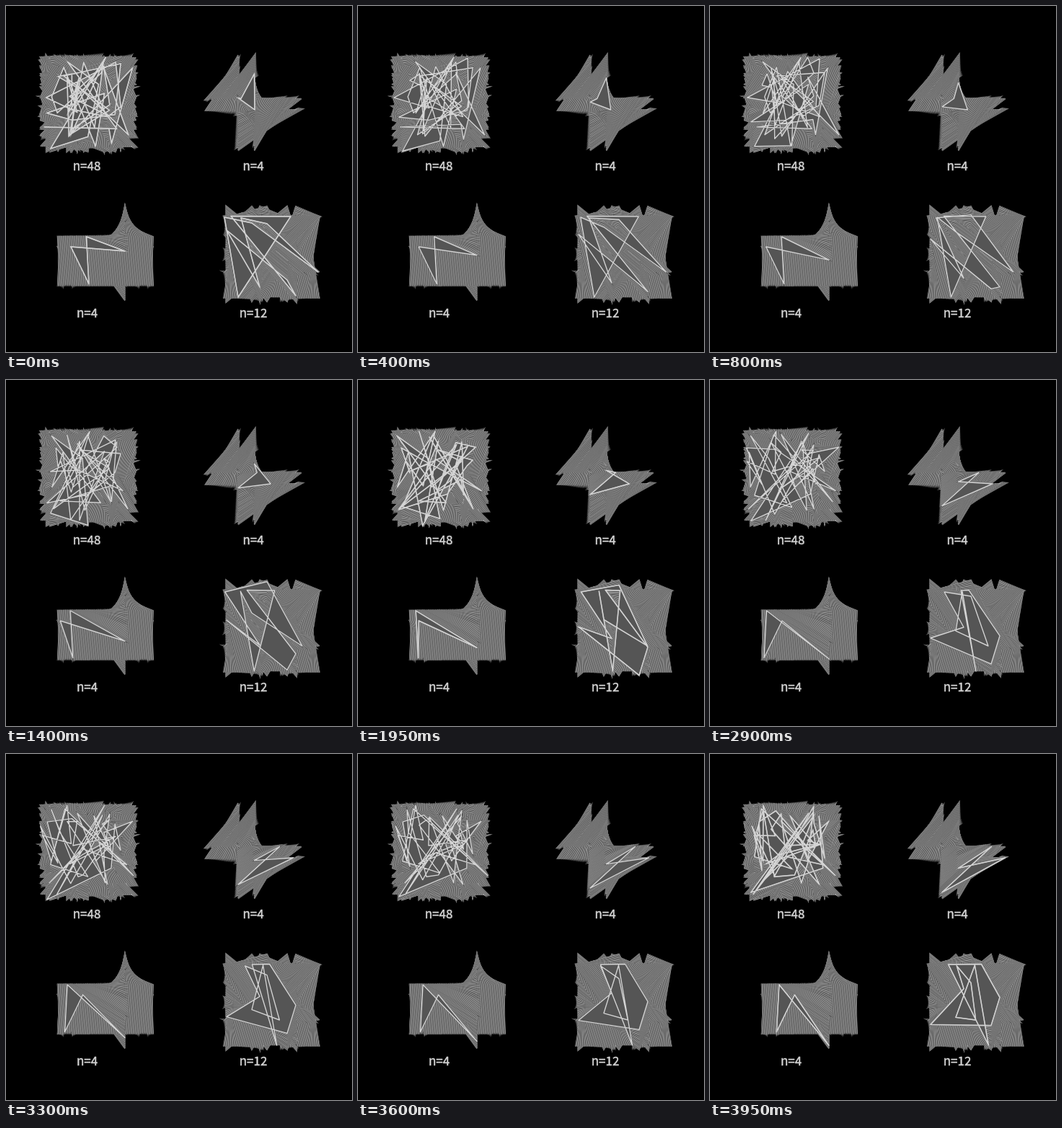
Animation, 480 px wide and 480 px high, one loop 4000 ms. Source, as an HTML page with a canvas:

```html
<!DOCTYPE html>
<html lang="en">
<head>
<meta charset="utf-8">
<title>Bouncing polygons</title>
<style>
html, body { margin: 0; width: 100%; height: 100%; overflow: hidden; background: #000; }
canvas { display: block; width: 480px; height: 480px; }
</style>
</head>
<body>
<canvas id="stage" width="480" height="480"></canvas>
<script>
const SIZE = 480, LOOP = 4000, STEP = 50;
const SPAN = 133;              // length of every vertex track
const SPEED = 0.825;           // pixels per step
const PERIOD = Math.ceil(2 * SPAN / SPEED);

// A vertex slides along one axis: [axis, fixed coordinate, start, direction].
const panels = [
  { x: 47.5, y: 69.5, label: [112, 228], points: scatter(48, 47.5, 69.5) },
  { x: 277, y: 68, label: [343, 228], points: [
    ['v', 322, 127.5, 1], ['h', 144, 345, 1], ['v', 344.5, 94, 1], ['h', 128.5, 326, 1]
  ] },
  { x: 71.5, y: 276, label: [112.5, 432], points: [
    ['h', 334, 90, -1], ['h', 385.5, 115, -1], ['h', 320, 111.5, -1], ['v', 165, 340, 1]
  ] },
  { x: 302, y: 277.5, label: [343, 432], points: [
    ['h', 291.5, 312, 1], ['v', 402, 402, -1], ['v', 390, 380, 1], ['v', 306, 311, 1],
    ['v', 352, 390, -1], ['h', 294, 326, -1], ['v', 362, 302, -1], ['h', 369, 433, -1],
    ['v', 341, 301, 1], ['h', 293, 303, 1], ['h', 404, 322, 1], ['h', 292, 395, -1]
  ] }
];

function scatter(count, x, y) {
  let seed = 20;
  const rand = () => (seed = (seed * 16807) % 2147483647) / 2147483647;
  for (let i = 0; i < 5; i++) rand();
  return Array.from({ length: count }, () => {
    const axis = rand() < 0.5 ? 'h' : 'v';
    const fixed = (axis === 'h' ? y : x) + rand() * SPAN;
    const start = (axis === 'h' ? x : y) + rand() * SPAN;
    return [axis, fixed, start, rand() < 0.5 ? 1 : -1];
  });
}

function bounce(start, dir, low, step) {
  const wide = 2 * SPAN;
  const d = (((start - low + dir * SPEED * step) % wide) + wide) % wide;
  return low + (d > SPAN ? wide - d : d);
}

function trace(ctx, panel, step) {
  ctx.beginPath();
  for (const [axis, fixed, start, dir] of panel.points) {
    if (axis === 'h') ctx.lineTo(bounce(start, dir, panel.x, step), fixed);
    else ctx.lineTo(fixed, bounce(start, dir, panel.y, step));
  }
  ctx.closePath();
}

function makeLayer() {
  const layer = document.createElement('canvas');
  layer.width = layer.height = SIZE;
  return layer.getContext('2d');
}

// Alternating edge shades beat against the pixel grid and give the silky bands.
function stamp(ctx, step) {
  ctx.fillStyle = '#555';
  ctx.strokeStyle = step % 2 ? '#484848' : '#a4a4a4';
  ctx.lineWidth = 1.6;
  for (const panel of panels) {
    trace(ctx, panel, step);
    ctx.fill();
    ctx.stroke();
  }
}

const stage = document.getElementById('stage').getContext('2d');
const base = makeLayer(), trail = makeLayer();
let last = Infinity;

// One full period of motion is already on the stage when the loop begins.
for (let s = -PERIOD; s <= 0; s++) stamp(base, s);

function drawLabel(text, [x, y]) {
  stage.lineWidth = 0.5;
  stage.strokeText(text, x, y);
  stage.fillText(text, x, y);
}

function draw(step) {
  if (step < last) {
    trail.clearRect(0, 0, SIZE, SIZE);
    trail.drawImage(base.canvas, 0, 0);
    last = 0;
  }
  while (last < step) stamp(trail, ++last);

  stage.fillStyle = '#000';
  stage.fillRect(0, 0, SIZE, SIZE);
  stage.drawImage(trail.canvas, 0, 0);
  stage.strokeStyle = stage.fillStyle = '#d4d4d4';
  stage.lineJoin = 'round';
  stage.font = '17px "Noto Sans CJK JP", "Noto Sans CJK SC", "Noto Sans", sans-serif';
  stage.textAlign = 'center';
  for (const panel of panels) {
    trace(stage, panel, step);
    stage.lineWidth = 1.4;
    stage.stroke();
    drawLabel('n=' + panel.points.length, panel.label);
  }
}

function frame() {
  const time = performance.now() % LOOP;
  const step = Math.max(0, Math.floor(time / STEP) - 1);
  if (step !== last) draw(step);
  requestAnimationFrame(frame);
}
draw(0);
requestAnimationFrame(frame);
</script>
</body>
</html>
```
